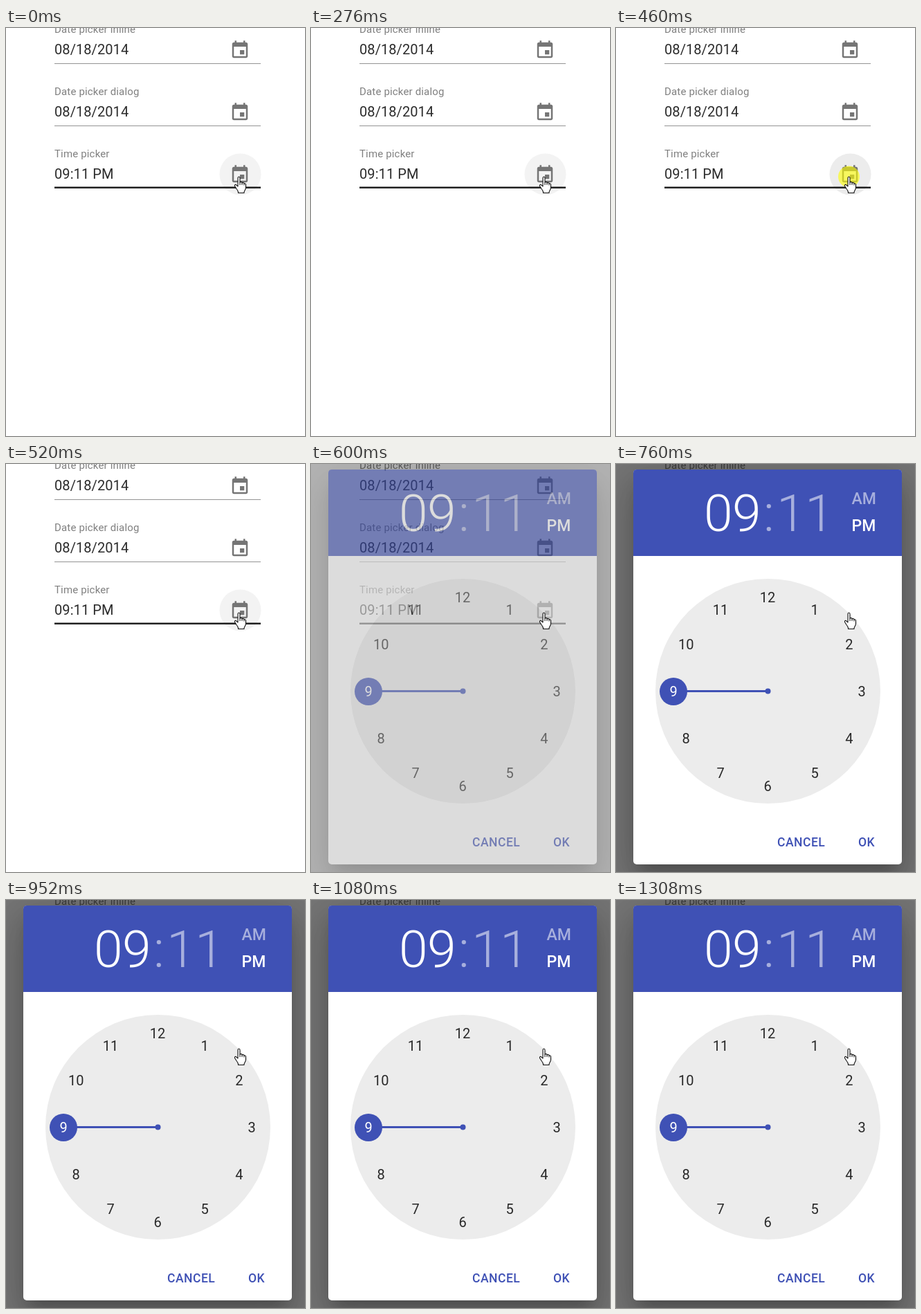
An HTML page for the animation above (1.46 s loop, 432 px wide and 590 px high).

```html
<!DOCTYPE html>
<html lang="en">
<head>
<meta charset="utf-8">
<title>Time picker</title>
<style>
  html, body { margin: 0; width: 100%; height: 100%; overflow: hidden; background: #fff; }
  svg, #backdrop { position: absolute; left: 0; top: 0; width: 432px; height: 590px; }
  text { font-family: Roboto, sans-serif; font-size: 20px; fill: #000; fill-opacity: .83; }
  #backdrop { background: #000; }
  #dialog {
    position: absolute; left: 25px; top: 8px; width: 388px; height: 571px;
    border-radius: 5px; background: #fff; overflow: visible;
    box-shadow: 0 14px 19px -9px rgba(0,0,0,.2), 0 30px 48px 4px rgba(0,0,0,.14), 0 11px 58px 10px rgba(0,0,0,.12);
  }
  #dialog svg { left: -25px; top: -8px; }
  .label { font-size: 15px; letter-spacing: .16px; fill-opacity: .5; }
  .value { letter-spacing: .08px; }
  .time { font-size: 75px; font-weight: 300; letter-spacing: -.00833em; }
  .half { font-size: 23px; font-weight: 500; }
  .time, .half, .picked { fill: #fff; fill-opacity: 1; }
  .dim { fill-opacity: .54; }
  .number { text-anchor: middle; }
  .button { font-size: 17.5px; font-weight: 500; letter-spacing: .02857em; fill: #3f51b5; fill-opacity: 1; }
</style>
</head>
<body>
<svg viewBox="0 0 432 590">
  <defs>
    <path id="calendar" fill="#757575" d="M17 12h-5v5h5v-5zM16 1v2H8V1H6v2H5c-1.11 0-1.99.9-1.99 2L3 19c0 1.1.89 2 2 2h14c1.1 0 2-.9 2-2V5c0-1.1-.9-2-2-2h-1V1h-2zm3 18H5V8h14v11z"/>
  </defs>
  <circle id="hover" cx="338.5" cy="211.5" r="30"/>
  <g id="fields"></g>
  <rect x="70" y="229.5" width="298" height="2.5" fill="#212121"/>
  <circle id="click" cx="336.5" cy="215" r="15.5" fill="#ff0" fill-opacity=".6"/>
</svg>
<div id="backdrop"></div>
<div id="dialog">
  <svg viewBox="0 0 432 590">
    <path fill="#3f51b5" d="M25 133V13q0-5 5-5h378q5 0 5 5v120z"/>
    <text class="time" x="127" y="97">09</text>
    <text class="time dim" x="213" y="97">:</text>
    <text class="time dim" x="232" y="97">11</text>
    <text class="half dim" x="340.5" y="58">AM</text>
    <text class="half" x="340.5" y="97">PM</text>
    <circle cx="219.5" cy="328.5" r="162.5" fill="#ececec"/>
    <g fill="#3f51b5">
      <rect x="100" y="327" width="120" height="3"/>
      <circle cx="219.5" cy="328.5" r="4"/>
      <circle cx="83" cy="329" r="20"/>
    </g>
    <g id="numbers"></g>
    <text class="button" x="233" y="553">CANCEL</text>
    <text class="button" x="350" y="553">OK</text>
  </svg>
</div>
<svg viewBox="0 0 432 590">
  <path fill="#fff" stroke="#111" stroke-width="1.1" stroke-linejoin="round"
    d="M335 229v-12q0-2 1.5-2t1.5 2v6q3-1 3 1q3-1 3 1q2.5-.5 2.5 1.5v4q0 2-1.5 4.5l-1 2v1.500h-8.500v-1.500q-.5-2-2.500-4.500l-2.500-4q-.5-2 1.500-2.200z"/>
  <path fill="none" stroke="#111" d="M338 223v4M341 224v3M344 225v2.500"/>
</svg>
<script>
const $ = id => document.getElementById(id);

const fields = [
  ["Date picker inline", "08/18/2014"],
  ["Date picker dialog", "08/18/2014"],
  ["Time picker", "09:11 PM"]
];
$("fields").innerHTML = fields.map(([label, value], i) => `
  <g transform="translate(0 ${90 * i})">
    <text class="label" x="70" y="7">${label}</text>
    <text class="value" x="70" y="38">${value}</text>
    <rect x="70" y="51" width="298" height="1" fill="#949494"/>
    <use href="#calendar" transform="translate(323 17) scale(1.25)"/>
  </g>`).join("");

$("numbers").innerHTML = Array.from({ length: 12 }, (_, i) => {
  const hour = i + 1, angle = hour * Math.PI / 6;
  const x = 219 + 136 * Math.sin(angle), y = 336 - 136.5 * Math.cos(angle);
  return `<text class="number${hour === 9 ? " picked" : ""}" x="${x}" y="${y}">${hour}</text>`;
}).join("");

const LOOP = 1460;
// The dialog and its backdrop fade in by hard steps: [start in ms, opacity].
const fade = [[0, 0], [600, .55], [690, .92], [760, 1]];
const start = performance.now();

function draw(now) {
  const t = Math.max(0, now - start) % LOOP;
  const shown = fade.filter(([from]) => t >= from).pop()[1];
  const pressed = t >= 460 && t < 520;
  $("backdrop").style.opacity = .54 * shown;
  $("dialog").style.opacity = shown;
  $("click").style.display = pressed ? "" : "none";
  $("hover").style.fill = pressed ? "#ececec" : "#f3f3f3";
  $("hover").style.display = shown ? "none" : "";
  requestAnimationFrame(draw);
}
draw(start);
</script>
</body>
</html>
```
